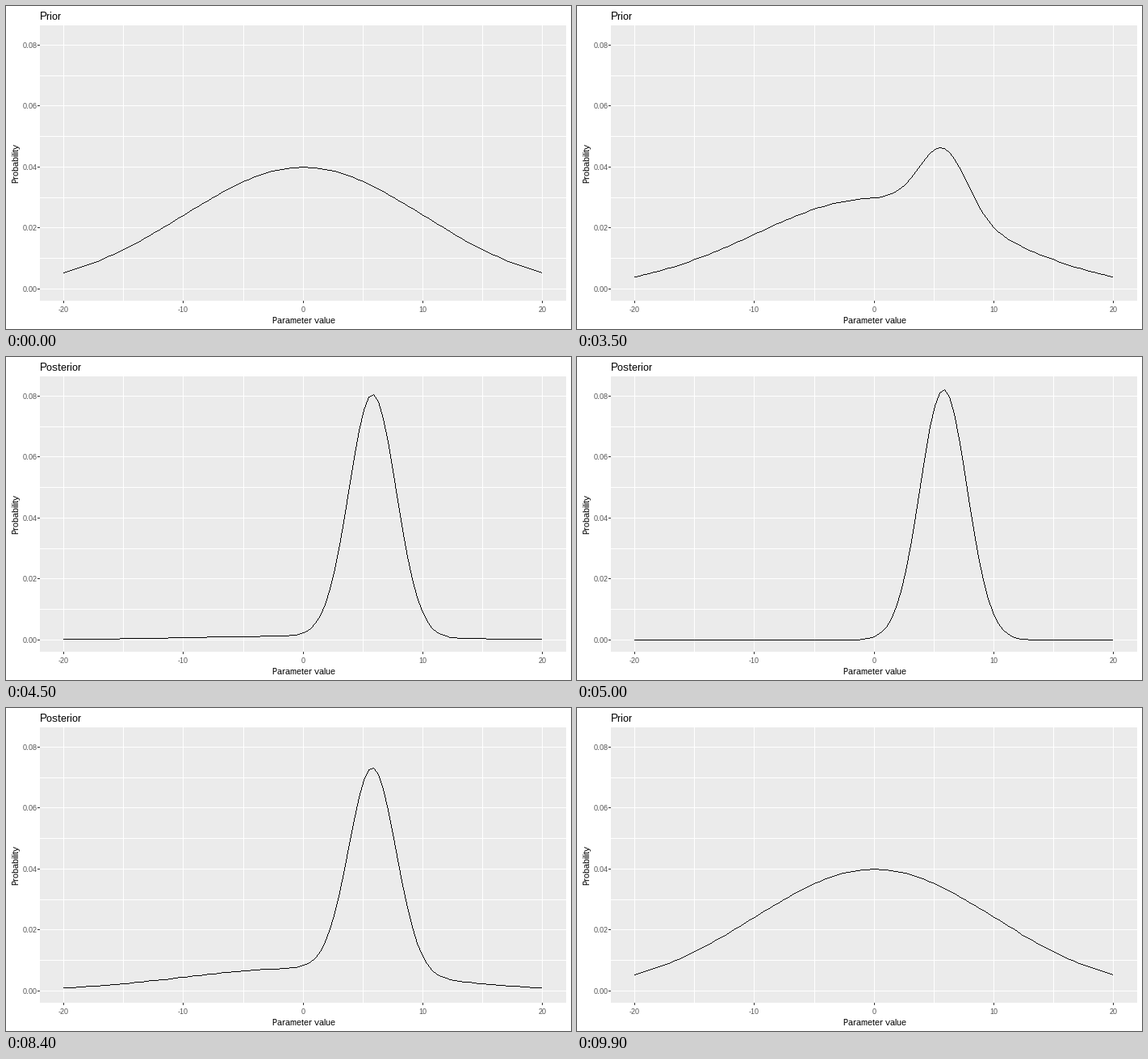
Animation, 700 px wide and 400 px high, one loop 10000 ms. Source, as a matplotlib script:

```python
import numpy as np
import matplotlib
import matplotlib.pyplot as plt
from matplotlib.animation import FuncAnimation
from matplotlib.patches import Rectangle

matplotlib.rcParams.update({
    "font.family": "Liberation Sans",
    "text.hinting": "native",
    "text.hinting_factor": 1,
    "toolbar": "None",
})

W, H, DPI = 700, 400, 100
FRAMES, INTERVAL = 100, 100
PX = 72 / DPI
LEFT, TOP, RIGHT, BOTTOM = 42, 24, 694, 365
TICK = 3


# Parameter and probability to whole pixel columns and rows
def to_x(v):
    return np.floor(71.56 + (np.asarray(v) + 20) * 14.8325).astype(int)


def to_y(p):
    return np.floor(350.5 - np.asarray(p) * 3777).astype(int)


def normal(x, mean, sd):
    return np.exp(-0.5 * ((x - mean) / sd) ** 2) / (sd * np.sqrt(2 * np.pi))


# Bayesian update on a grid of parameter values
grid = np.linspace(-20, 20, 100)
prior = normal(grid, 0, 10)
posterior = prior * normal(grid, 6, 2)
posterior /= posterior.sum()

fig = plt.figure(figsize=(W / DPI, H / DPI), dpi=DPI, facecolor="white")
ax = fig.add_axes([0, 0, 1, 1])


def box(x, y, w, h, color, z):
    ax.add_patch(Rectangle((x, y), w, h, fc=color, ec="none", lw=0,
                           antialiased=False, zorder=z))


def label(x, y, s, size, color="black", ha="center", va="baseline", **kw):
    return ax.text(x, y, s, fontsize=size * PX, color=color, ha=ha, va=va,
                   zorder=4, **kw)


def trace(xs, ys):
    """One-pixel polyline without smoothing, as a transparent layer."""
    layer = np.zeros((H, W, 4), np.uint8)
    for x0, y0, x1, y1 in zip(xs, ys, xs[1:], ys[1:]):
        n = max(abs(x1 - x0), abs(y1 - y0))
        t = np.arange(n) / n
        cols = np.floor(x0 + (x1 - x0) * t + 0.5).astype(int)
        rows = np.floor(y0 + (y1 - y0) * t + 0.5).astype(int)
        layer[rows, cols, 3] = 255
    return layer


curve = ax.imshow(trace(to_x(grid), to_y(prior)), extent=(0, W, H, 0),
                  aspect="auto", interpolation="nearest", zorder=3)
ax.set_xlim(0, W)
ax.set_ylim(H, 0)
ax.axis("off")

box(LEFT, TOP, RIGHT - LEFT, BOTTOM - TOP, "#EBEBEB", 0)

for v in range(-20, 21, 5):
    x = to_x(v)
    box(x, TOP, 1, BOTTOM - TOP, "white", 1)
    if v % 10 == 0:
        box(x, BOTTOM, 1, TICK, "#333333", 2)
        label(x + 0.5, 379, str(v), 9, "#4D4D4D")

for k in range(9):
    y = to_y(k / 100)
    box(LEFT, y, RIGHT - LEFT, 1, "white", 1)
    if k % 2 == 0:
        box(LEFT - TICK, y, TICK, 1, "#333333", 2)
        label(38.5, y + 4, f"{k / 100:.2f}", 9, "#4D4D4D", "right")

label(368.5, 393, "Parameter value", 11)
label(17, 194.5, "Probability", 11, ha="right", va="center", rotation=90)
title = label(42, 17, "Prior", 13, ha="left")


def ease(t):
    return 4 * t ** 3 if t < 0.5 else 1 - 4 * (1 - t) ** 3


def update(i):
    # hold 25 frames, then move for 25, in each direction
    back, step = divmod(i, 50)
    t = max(0, step - 25) / 25
    if back:
        t = 1 - t
    w = ease(t)
    curve.set_data(trace(to_x(grid), to_y((1 - w) * prior + w * posterior)))
    title.set_text("Posterior" if t > 0.5 else "Prior")
    return curve, title


anim = FuncAnimation(fig, update, frames=FRAMES, interval=INTERVAL,
                     repeat=True, repeat_delay=0, blit=False)
plt.show()
```
